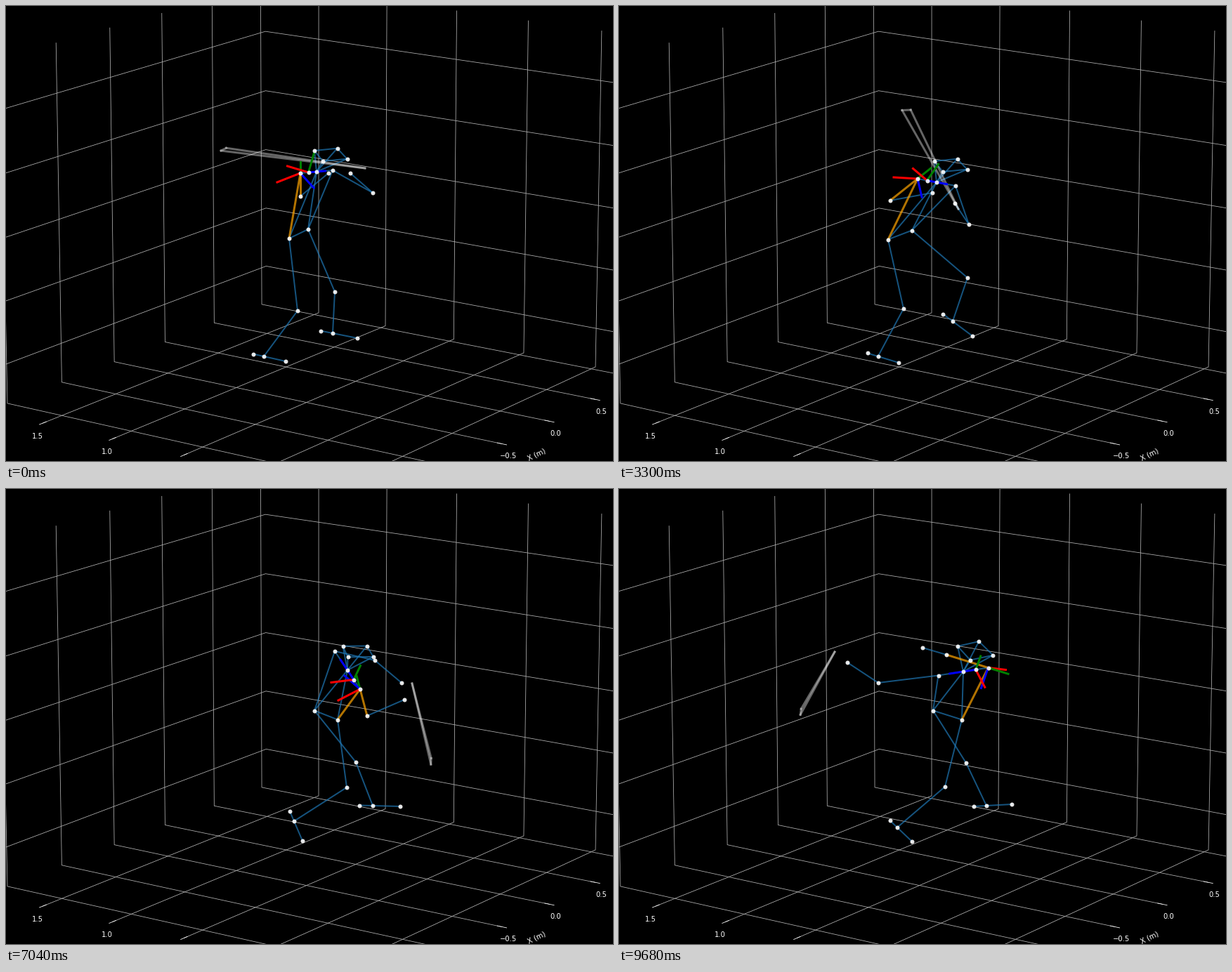
Write a matplotlib script that moves like this. It is 864x648 px and loops after 9790 ms.

```python
import numpy as np
import matplotlib.pyplot as plt
from matplotlib.animation import FuncAnimation

W, H, DPI = 864, 648, 72
FRAMES, STEP = 89, 110

plt.rcParams["font.family"] = "DejaVu Sans"
fig = plt.figure(figsize=(W / DPI, H / DPI), dpi=DPI, facecolor="black")
ax = fig.add_axes([0, 0, 1, 1])
ax.set_xlim(0, W)
ax.set_ylim(H, 0)
ax.axis("off")

# ---------- room, seen in perspective from its back corner ----------
XS = 0.097 + np.arange(6)
YS = 0.801 + np.arange(5)
ZS = 0.633 + np.arange(5)
X_END, Y_END, Z_END = 5.44, 5.46, 5.42
TICK = 0.062


def project(x, y, z=0):
    depth = 1 - 0.016 * x - 0.01159 * y - 0.0038 * z
    return np.array([370.5 + (-66.4 * x + 92.16 * y - 0.27 * z) / depth,
                     422.4 + (25.86 * x + 18.01 * y - 81.9 * z) / depth])


def edge(*corners, color="#b0b0b0"):
    u, v = np.transpose([project(*c) for c in corners])
    ax.plot(u, v, color=color, lw=0.8, zorder=1)


def label(x, y, text, angle=0):
    ax.text(x, y, text, color="white", fontsize=10, rotation=angle,
            ha="center", va="center")


def tick_label(pos, value):
    label(*pos, f"{value:.1f}".replace("-", "\u2212"))


for z in ZS:
    edge((X_END, 0, z), (0, 0, z), (0, Y_END, z))
for k, x in enumerate(XS):
    edge((x, 0, Z_END), (x, 0, 0), (x, Y_END, 0))
    edge((x, Y_END - TICK, 0), (x, Y_END + TICK, 0), color="white")
    tick_label(project(x, Y_END) + (9, 17.5), 1 - k / 2)
for k, y in enumerate(YS):
    edge((0, y, Z_END), (0, y, 0), (X_END, y, 0))
    edge((X_END - TICK, y, 0), (X_END + TICK, y, 0), color="white")
    tick_label(project(X_END, y) + (-7.5, 19), 1.5 - k / 2)
label(755, 639, "X (m)", 26)

# ---------- motion ----------
MAIN = (0, 17, 30, 45, 64, 72, 88)
ARMS = (0, 17, 30, 45, 57, 64, 67, 72, 80, 88)


def glide(values, times=MAIN):
    """Monotone cubic motion through the values, one row per frame."""
    t = np.array(times, float)
    v = np.array(values, float).reshape(len(t), -1)
    h = np.diff(t)[:, None]
    d = np.diff(v, axis=0) / h
    m = np.zeros_like(v)
    m[0], m[-1] = d[0], d[-1]
    a, b = d[:-1], d[1:]
    same = a * b > 0
    m[1:-1] = np.where(same, 2 * a * b / np.where(same, a + b, 1), 0)
    f = np.arange(FRAMES)
    i = np.clip(np.searchsorted(t, f, side="right") - 1, 0, len(t) - 2)
    u = (f - t[i])[:, None] / h[i]
    return ((1 + 2 * u) * (1 - u) ** 2 * v[i] + u * (1 - u) ** 2 * h[i] * m[i]
            + u * u * (3 - 2 * u) * v[i + 1] + u * u * (u - 1) * h[i] * m[i + 1])


def pair(x, y):
    return np.column_stack(np.broadcast_arrays(x, y))


# trunk: shoulders mirror about the neck, hips about the pelvis
neck = glide([(442, 236), (444, 245), (452, 251), (468, 253),
              (486, 258), (489, 265), (490, 260)])
half = glide([(-23, 2), (-25, -2.5), (-27, -5), (-31, -6), (-30, 0),
              (18, 27), (37, 12), (35.5, -5.5)],
             (0, 17, 30, 45, 56, 64, 72, 88))
pelvis = glide([(416.5, 324.5), (398, 325.5), (400, 326), (420.5, 326),
                (455.5, 322), (468, 316), (467.5, 322)])
hip = pair(glide([-13.5, -15, -17, -18.5, 16.5, 19, 20.5])[:, 0], 6.5)
r_shoulder, l_shoulder = neck + half, neck - half
r_hip, l_hip = pelvis + hip, pelvis - hip
collar = neck + half / 2

# head: a skewed ring that rises as it turns
turn = glide([0, 0, 0, 0, -1, 0.4, 1.2])[:, 0]
back = neck + pair(-3 - 3.5 * turn ** 2, -30 - 4.2 * turn ** 2)
side = pair(32.5 - 1.8 * turn, -3.3 - 3 * turn)
front = pair(12 + 5 * turn, 15 + 1.5 * turn + 2 * turn ** 2)
head = [back, back + side, back + side + front + (2, 0), back + front]

r_elbow = glide([(419, 271), (401, 274), (386, 277), (373, 271), (405, 292),
                 (514, 323), (546, 298), (519, 263), (484, 240), (466, 236)], ARMS)
r_hand = glide([(459, 238), (455, 256), (446, 266), (434, 266), (450, 270),
                (567, 300), (584, 270), (506, 239), (449, 223), (432, 226)], ARMS)
l_elbow = glide([(522, 266), (503, 298), (498, 311), (504, 308), (518, 298),
                 (525, 244), (512, 238), (432, 250), (377, 259), (369, 276)], ARMS)
l_hand = glide([(490, 238), (486, 267), (478, 281), (469, 280), (486, 280),
                (563, 276), (572, 259), (472, 230), (350, 222), (325, 247)], ARMS)

r_knee = glide([(415, 434), (404, 432), (405, 431), (410, 431),
                (485, 425), (482, 416), (464, 424)])
l_knee = glide([(468, 407), (480, 401), (496, 387), (514, 396),
                (498, 389), (490, 388), (494, 390)])
REAR = (0, 55, 64, 72, 88)
r_ankle = glide([(367, 499), (371, 499), (410, 473), (407, 470), (396, 482)], REAR)
r_toe = glide([(398, 506), (399, 509), (422, 501), (426, 495), (417, 502)], REAR)
l_ankle = glide([(465, 466), (471, 456), (475, 449), (530, 443),
                 (522, 451), (524, 450), (523, 451)])
l_toe = glide([(500, 473), (502, 473), (503, 470), (562, 457),
               (561, 452), (560, 449), (559, 449)])
r_heel = r_ankle - (r_toe - r_ankle) / 2
l_heel = l_ankle - (l_toe - l_ankle) / 2

# axes: green follows the limb, blue of the chest the shoulder line
chest_axes = [glide([(-30, -9), (-25, -14), (-20, -17), (-13, -17),
                     (-32, 4), (-10, 24), (13, 25)]),
              0.31 * (neck - pelvis),
              -1.04 * half]
arm_axes = [glide([(-33, 13), (-36, 3), (-34, -2), (-23, -5),
                   (-31, 16), (31, 16), (25, 3)]),
            -0.48 * (r_elbow - r_shoulder),
            glide([(19, 21), (9, 25), (6, 26), (8, 28),
                   (-22, -19), (-23, 24), (-10, 29)])]

# bat: held near the left hand, swung as an angle and a visible length
knob = l_hand + glide([(21, -7), (14, 3), (5, 8), (-4, 7),
                       (15, 1), (15, 18), (-18, -15)])
angle, reach = glide([(172.4, 203), (137.3, 173), (117.7, 159), (109.6, 143),
                      (116, 122), (150, 125), (187, 158), (225, 163),
                      (283.7, 114), (355, 162), (400, 145), (426, 100),
                      (444.2, 89), (465, 91), (508, 125), (548, 187),
                      (600.5, 98)],
                     (0, 17, 30, 45, 54, 57, 59, 61, 64, 66, 68, 70,
                      72, 74, 77, 81, 88)).T
swing = np.radians(angle)
tip = knob + pair(reach * np.cos(swing), -reach * np.sin(swing))
width = pair(3.3 + 3.2 * np.sin(swing), -2.2 * (1 - np.sin(swing)))
tip_a, tip_b = tip - width, tip + width

# ---------- drawing ----------
strokes = []


def stroke(p, q, color, lw, alpha, z):
    art, = ax.plot([], [], color=color, lw=lw, alpha=alpha, zorder=z)
    strokes.append((art, p, q))


def chain(*joints):
    for p, q in zip(joints, joints[1:]):
        stroke(p, q, "#1f77b4", 2, 0.7, 3)


chain(*head, head[0])
for joint in head + [r_shoulder, l_shoulder, r_hip, l_hip]:
    chain(neck, joint)
chain(l_shoulder, l_hip, r_hip)
chain(r_elbow, r_hand)
chain(l_shoulder, l_elbow, l_hand)
chain(r_hip, r_knee, r_ankle, r_toe)
chain(l_hip, l_knee, l_ankle, l_toe)
chain(r_ankle, r_heel)
chain(l_ankle, l_heel)

for p, q in [(knob, tip_a), (knob, tip_b), (tip_a, tip_b)]:
    stroke(p, q, "white", 3, 0.4, 4)
for joint in (r_elbow, r_hip):
    stroke(r_shoulder, joint, "orange", 3, 0.7, 5)
for base, axes in [(r_shoulder, arm_axes), (collar, chest_axes)]:
    for offset, color in zip(axes, ("red", "green", "blue")):
        stroke(base, base + offset, color, 3, 1, 6)

joints = np.array(head + [neck, collar, r_shoulder, l_shoulder, r_hip, l_hip,
                          r_elbow, r_hand, l_elbow, l_hand, r_knee, l_knee,
                          r_ankle, l_ankle, r_heel, l_heel, r_toe, l_toe])
dots, = ax.plot([], [], "o", color="white", ms=6, mew=0, alpha=0.9, zorder=7)


def draw(frame):
    for art, p, q in strokes:
        art.set_data(*zip(p[frame], q[frame]))
    dots.set_data(*joints[:, frame].T)
    return [art for art, _, _ in strokes] + [dots]


anim = FuncAnimation(fig, draw, frames=FRAMES, interval=STEP,
                     repeat=True, repeat_delay=0)
plt.show()
```
